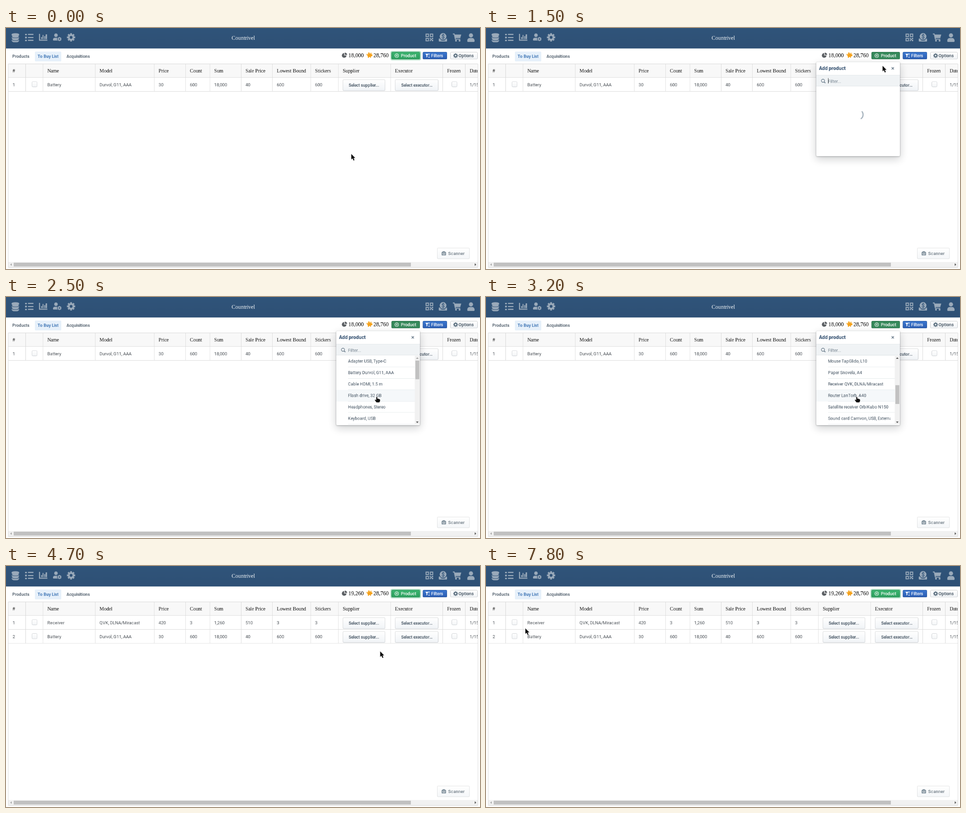
An HTML page with a canvas for the animation above (8 s loop, 1049x534 px).

```html
<!DOCTYPE html>
<html lang="en">
<head>
<meta charset="utf-8">
<title>To Buy List</title>
<style>
html, body { margin: 0; width: 100%; height: 100%; overflow: hidden; background: #fff; }
canvas { display: block; width: 1049px; height: 534px; }
</style>
</head>
<body>
<canvas id="stage"></canvas>
<script>
// The page is laid out on a larger screen and shown reduced by K.
const W = 1049, H = 534, K = 1.3, LOOP = 8000, STEP = 100;
const stage = document.getElementById('stage');
const dpr = window.devicePixelRatio || 1;
stage.width = W * dpr;
stage.height = H * dpr;
const out = stage.getContext('2d');
const screen = document.createElement('canvas');
screen.width = Math.ceil(W * K);
screen.height = Math.ceil(H * K);
const c = screen.getContext('2d');

const sans = (size, weight = 400) => `${weight} ${size}px Roboto, sans-serif`;
const serif = size => `${size}px "Liberation Serif", serif`;
const INK = '#3d4d5c', ICON = '#9aaaba', LINE = '#d8d8d8', PX = 1 / K;

// ---- drawing helpers ----
const snap = v => Math.round(v * K) / K;

function box(x, y, w, h, fill, r = 0, edge) {
  const x0 = snap(x), y0 = snap(y);
  const w0 = Math.max(PX, snap(x + w) - x0), h0 = Math.max(PX, snap(y + h) - y0);
  if (fill) {
    c.beginPath();
    c.roundRect(x0, y0, w0, h0, r);
    c.fillStyle = fill;
    c.fill();
  }
  if (edge) {
    c.beginPath();
    c.roundRect(x0 + PX / 2, y0 + PX / 2, w0 - PX, h0 - PX, r);
    c.strokeStyle = edge;
    c.lineWidth = PX;
    c.stroke();
  }
}
// Screen text: every glyph advances by whole pixels.
function text(s, x, y, font, color, centered) {
  c.save();
  c.setTransform(1, 0, 0, 1, 0, 0);
  c.font = font;
  c.fillStyle = color;
  const steps = [...s].map(ch => Math.round(c.measureText(ch).width));
  let left = Math.round(x * K - (centered ? steps.reduce((a, b) => a + b, 0) / 2 : 0));
  [...s].forEach((ch, i) => {
    c.fillText(ch, left, Math.round(y * K));
    left += steps[i];
  });
  c.restore();
}
function poly(points, fill) {
  c.beginPath();
  points.forEach(([x, y]) => c.lineTo(x, y));
  c.closePath();
  c.fillStyle = fill;
  c.fill();
}
function disc(x, y, rx, fill, ry = rx) {
  c.beginPath();
  c.ellipse(x, y, rx, ry, 0, 0, Math.PI * 2);
  c.fillStyle = fill;
  c.fill();
}
function stroke(points, color, width) {
  c.beginPath();
  points.forEach(([x, y]) => c.lineTo(x, y));
  c.strokeStyle = color;
  c.lineWidth = width;
  c.stroke();
}
function ring(x, y, r, color, width, from = 0, to = Math.PI * 2) {
  c.beginPath();
  c.arc(x, y, r, from, to);
  c.strokeStyle = color;
  c.lineWidth = width;
  c.stroke();
}
function fade(y, h, top, bottom) {
  const g = c.createLinearGradient(0, y, 0, y + h);
  g.addColorStop(0, top);
  g.addColorStop(1, bottom);
  return g;
}
function clip(x, y, w, h, draw) {
  c.save();
  c.beginPath();
  c.rect(x, y, w, h);
  c.clip();
  draw();
  c.restore();
}
function gear(x, y, r, color) {
  for (let i = 0; i < 8; i++) {
    c.save();
    c.translate(x, y);
    c.rotate(i * Math.PI / 4);
    c.fillStyle = color;
    c.fillRect(-r * 0.22, -r, r * 0.44, r * 0.5);
    c.restore();
  }
  ring(x, y, r * 0.55, color, r * 0.42);
}
function bust(x, y, s, color) {
  disc(x, y - 4.6 * s, 4.6 * s, color);
  box(x - 8 * s, y + 1.5 * s, 16 * s, 8 * s, color, [5 * s, 5 * s, 1.5 * s, 1.5 * s]);
}

// ---- top bar ----
const BAR = '#2f5277';
const barIcons = [
  () => {
    for (let i = 2; i >= 0; i--) {
      const y = 14 + i * 6;
      box(12.5, y, 16.5, 5.5, ICON, [0, 0, 5, 5]);
      disc(20.75, y, 8.25, ICON, 2.5);
      if (i) {
        c.beginPath();
        c.ellipse(20.75, y - 0.6, 8.25, 2.4, 0, 0, Math.PI);
        c.strokeStyle = BAR;
        c.lineWidth = 1;
        c.stroke();
      }
    }
  },
  () => [14.5, 21, 27.5].forEach(y => {
    box(42.5, y - 1.7, 3.4, 3.4, ICON, 0.8);
    box(48.5, y - 1.2, 12.5, 2.4, ICON, 0.8);
  }),
  () => {
    stroke([[74.2, 13], [74.2, 27], [91.5, 27]], ICON, 2.2);
    [[77.5, 20], [81, 15.5], [84.5, 18], [88, 14]].forEach(([x, y]) => box(x, y, 2.4, 24.5 - y, ICON, 0.6));
  },
  () => {
    bust(110.5, 20, 0.85, ICON);
    disc(118.3, 24.4, 5.4, BAR);
    gear(118.3, 24.4, 4.6, ICON);
  },
  () => gear(144, 20.7, 9.2, ICON),
  () => {
    [[929.5, 13.5], [939, 13.5], [929.5, 23]].forEach(([x, y]) => {
      c.strokeStyle = ICON;
      c.lineWidth = 2;
      c.strokeRect(x, y, 5.5, 5.5);
    });
    [[937.5, 21.5], [942.5, 21.5], [940, 24], [937.5, 26.5], [942.5, 26.5]].forEach(([x, y]) => box(x, y, 2.6, 2.9, ICON));
  },
  () => {
    box(958, 23, 18.5, 7, ICON, 1.5);
    disc(967.2, 18.6, 8.6, BAR);
    disc(967.2, 18.6, 7.4, ICON);
    text('$', 967.2, 22.9, sans(15.6, 700), BAR, true);
    box(962, 26.6, 10.5, 1.2, BAR);
  },
  () => {
    stroke([[989, 13.3], [992, 13.3], [994.5, 24.8], [1005.3, 24.8]], ICON, 2);
    poly([[992.4, 14.5], [1007.5, 14.5], [1005.3, 22.5], [994.2, 22.5]], ICON);
    disc(995.8, 28, 2, ICON);
    disc(1003.8, 28, 2, ICON);
  },
  () => bust(1029, 21, 1, ICON),
];
function topBar() {
  box(0, 0, W + 1, 45.4, fade(0, 45, '#30547a', '#2e5075'));
  barIcons.forEach(draw => draw());
  text('Countrivel', 525, 26.1, serif(16), '#f3f6f8', true);
}

// ---- toolbar ----
const looks = {
  plain: ['#ffffff', '#f1f4f7', 'rgba(16,22,26,.2)'],
  green: ['#3bb570', '#2b9e5d', 'rgba(16,22,26,.2)'],
  pressed: ['#35895a', '#35895a', 'rgba(16,22,26,.2)'],
  blue: ['#3c78d0', '#2b5db2', 'rgba(16,22,26,.25)'],
};
function button(x, y, w, h, kind) {
  const [top, bottom, edge] = looks[kind];
  box(x, y, w, h, fade(y, h, top, bottom), 2.3, edge);
}
function toolbar(s) {
  box(64, 52.5, 58, 21, '#e6f0fa', 2);
  text('Products', 14.2, 66.3, sans(12, 500), INK);
  text('To Buy List', 70.3, 66.3, sans(12, 500), '#2a66ad');
  text('Acquisitions', 134, 66.3, sans(12, 500), INK);

  // totals
  c.beginPath();
  c.moveTo(748.4, 60.8);
  c.arc(748.4, 60.8, 5.2, 0, Math.PI * 1.5);
  c.fillStyle = '#5b5f63';
  c.fill();
  c.beginPath();
  c.moveTo(749.7, 59.6);
  c.arc(749.7, 59.6, 5.2, -Math.PI / 2, 0);
  c.fill();
  text(s.added ? '19,260' : '18,000', 758, 64.6, serif(16), '#000');
  const PIG = '#f5a21b';
  disc(804.5, 60.6, 4.9, PIG, 3.9);
  disc(803, 55.8, 1.8, PIG);
  box(801, 63, 2, 3.2, PIG);
  box(806, 63, 2, 3.2, PIG);
  box(807.5, 58.8, 3, 3.4, PIG, 0.7);
  poly([[806, 55.3], [809, 54.8], [808.5, 59]], PIG);
  ring(799, 58.8, 1.2, PIG, 0.8);
  text('28,760', 813.3, 64.6, serif(16), '#000');

  const y = 53.1, h = 16.2, mid = y + h / 2, base = 64.6;
  if (!s.popup) box(850.8, y - 2.3, 67.3, h + 4.6, 'rgba(46,170,100,.4)', 4);
  button(853, y, 63, h, s.popup || s.hover ? 'pressed' : 'green');
  ring(864.7, mid, 4.1, '#fff', 1.1);
  stroke([[862.6, mid], [866.8, mid]], '#fff', 1.1);
  stroke([[864.7, mid - 2.1], [864.7, mid + 2.1]], '#fff', 1.1);
  text('Product', 873.5, base, sans(12.6, 500), '#fff');

  button(922, y, 54.5, h, 'blue');
  poly([[928, 57.1], [935, 57.1], [932.5, 60.3], [932.5, 63.8], [930.5, 65.3], [930.5, 60.3]], '#fff');
  [57.2, 60.4, 63.6].forEach(top => box(934.5, top, 3.2, 1.4, '#fff'));
  text('Filters', 941, base, sans(12.6, 500), '#fff');

  button(983, y, 61, h, 'plain');
  gear(995, mid, 5.1, '#5c7080');
  text('Options', 1001.6, base, sans(12.6, 500), INK);
}

// ---- table ----
const widths = [50, 50, 150, 170, 90, 70, 90, 90, 110, 80, 150, 150, 65, 100];
const heads = ['#', '', 'Name', 'Model', 'Price', 'Count', 'Sum', 'Sale Price', 'Lowest Bound', 'Stickers', 'Supplier', 'Executor', 'Frozen', 'Date'];
const battery = ['', 'Battery', 'Durvol, G11, AAA', '30', '600', '18,000', '40', '600', '600'];
const receiver = ['', 'Receiver', 'QVK, DLNA/Miracast', '420', '3', '1,260', '510', '3', '3'];
const ROW = 40 / K, HEAD = 103 / K, BODY = 143 / K, PAD = 13 / K;
const left = [];
widths.reduce((x, w) => (left.push(x / K), x + w), 6);

function checkbox(x, y) {
  box(x, y, 12.3, 12.3, fade(y, 12, '#ffffff', '#f3f5f7'), 2.3, '#c8ccd0');
}
function row(cells, i) {
  const y = BODY + i * ROW;
  [String(i + 1), ...cells].forEach((s, k) => text(s, left[k] + PAD, y + 19.2, sans(12.6), '#4c5258'));
  checkbox(56.7, y + 8.7);
  checkbox(986.2, y + 8.7);
  [[745.5, 93.5, 'Select supplier...'], [861, 96, 'Select executor...']].forEach(([x, w, label]) => {
    button(x, y + 4, w, 25, 'plain');
    text(label, x + w / 2, y + 20.2, sans(12, 500), INK, true);
  });
  text('1/15/2021', left[13] + PAD, y + 19.2, sans(12.6), '#4c5258');
  box(5, y + ROW - PX, 1040, PX, LINE);
}
function table(s) {
  const rows = s.added ? [receiver, battery] : [battery];
  clip(5, 79, 1039.5, 452, () => {
    box(5, HEAD, 1040, ROW, '#f8f8f8');
    heads.forEach((h, i) => text(h, left[i] + PAD, 98.6, serif(14.4), '#111'));
    rows.forEach(row);
    box(5, BODY - PX, 1040, PX, LINE);
    left.slice(1).forEach(x => box(x, HEAD, PX, ROW * (rows.length + 1), LINE));
  });
  // horizontal scrollbar
  box(5, 518.5, 1039, 11.5, '#f1f1f1');
  box(17, 520, 879, 8.5, '#c1c1c1');
  poly([[9.3, 524.3], [12.7, 521.4], [12.7, 527.2]], '#a3a3a3');
  poly([[1040.7, 524.3], [1037.3, 521.4], [1037.3, 527.2]], '#505050');
  box(4.6, 79, 1040, 452, null, 0, '#d0d0d0');
}
function scanner() {
  c.save();
  c.globalAlpha = 0.72;
  button(954, 487, 72, 24.6, 'plain');
  box(963.8, 496.3, 10.4, 7.6, '#5c7080', 1.3);
  box(966.5, 494.7, 5, 3, '#5c7080', 1);
  disc(969, 500, 2.7, '#fff');
  disc(969, 500, 1.6, '#5c7080');
  text('Scanner', 978.8, 503.1, sans(12.6, 500), INK);
  c.restore();
}

// ---- popup ----
const PITCH = 33 / K, TOTAL = 19, TOP = 168.5 / K, VIEW = 153;
const items = [
  'Adapter USB, Type-C', 'Battery Durvol, G11, AAA', 'Cable HDMI, 1.5 m', 'Flash drive, 32 GB',
  'Headphones, Stereo', 'Keyboard, USB', 'Lamp, LED', 'Monitor, 24 inch',
  'Mouse TapGlido, L10', 'Paper Snovela, A4', 'Receiver QVK, DLNA/Miracast', 'Router LanTorb, A40',
  'Satellite receiver OrbiKubo N150', 'Sound card Carrivon, USB, External',
];
function list(s) {
  clip(731, TOP, 185, VIEW, () => {
    items.forEach((label, i) => {
      const y = TOP + (i - s.scroll) * PITCH;
      if (y < TOP - PITCH || y > TOP + VIEW) return;
      if (s.hand && s.y >= y && s.y < y + PITCH) box(731, y, 173.5, PITCH, s.t < 3500 ? '#f5f8fa' : '#f0f4f9');
      clip(757, y, 138, PITCH, () => text(label, 756.6, y + 15.8, sans(12), INK));
      box(757, y + PITCH - PX, 147.5, PX, '#e2e7ea');
    });
    box(904.5, TOP, 11.5, VIEW, '#f1f1f1');
    const thumb = 130 * VIEW / (TOTAL * PITCH);
    box(906, 141 + 130 * s.scroll / TOTAL, 8.5, thumb, '#c1c1c1');
    poly([[910.2, 133.6], [913, 137], [907.4, 137]], s.scroll ? '#505050' : '#a3a3a3');
    poly([[910.2, 279.3], [913, 275.9], [907.4, 275.9]], '#505050');
  });
}
function popup(s) {
  c.save();
  c.globalAlpha = s.alpha;
  c.shadowColor = 'rgba(16,22,26,.2)';
  [[8, 24], [2, 4]].forEach(([drop, blur]) => {
    c.shadowOffsetY = drop;
    c.shadowBlur = blur;
    box(731, 75, 185, 208.5, '#fff', 2.3);
  });
  c.shadowColor = 'transparent';
  box(731 - PX, 75 - PX, 185 + 2 * PX, 208.5 + 2 * PX, null, 2.6, 'rgba(16,22,26,.1)');
  text('Add product', 737, 93.4, sans(14, 700), '#2c4a6b');
  stroke([[897.6, 86.8], [902.8, 92]], '#5c7080', 1.4);
  stroke([[902.8, 86.8], [897.6, 92]], '#5c7080', 1.4);
  box(731, 104, 185, 25.5, '#f0f3f5');
  box(731, 104, 185, PX, '#e0e5e8');
  box(731, 128.8, 185, PX, '#dce2e6');
  ring(745.8, 116.8, 3.5, '#6b7d8c', 1.3);
  stroke([[748.4, 119.4], [751, 122]], '#6b7d8c', 1.8);
  text('Filter...', 756.6, 121.3, sans(12.6), '#75838f');
  if (s.caret) box(757, 111, PX, 12, '#222');
  if (s.listed) list(s);
  else if (s.t >= 1300) {
    const a = 0.6 + (s.t - 2100) / 500 * Math.PI * 2;
    c.lineCap = 'round';
    ring(823.5, 192, 11, '#a5b2bd', 2.5, a, a + Math.PI / 2);
  }
  c.restore();
}

// ---- pointer ----
const ease = u => u * u * (3 - 2 * u);
// time, x, y, glide from the previous key
const path = [
  [0, 764, 279], [200, 764, 279], [1000, 886, 65, 1], [1300, 886, 65], [2100, 832, 185, 1],
  [2500, 820.5, 221, 1], [3500, 825, 200], [3700, 828, 189], [4700, 828, 189], [5000, 831, 185],
  [5300, 825, 192], [5500, 668, 302], [5800, 334, 242], [6000, 333, 241], [7200, 341, 237],
  [7400, 155, 174], [7600, 126, 160], [7800, 87, 138],
];
function pointerAt(t) {
  const next = path.findIndex(k => k[0] > t);
  const a = path[next < 0 ? path.length - 1 : next - 1], b = path[next];
  if (!b || !b[3]) return [a[1], a[2]];
  const u = ease((t - a[0]) / (b[0] - a[0]));
  return [a[1] + (b[1] - a[1]) * u, a[2] + (b[2] - a[2]) * u];
}
const arrow = new Path2D('M0 0V12.4L2.9 9.8L5 14.7L7.2 13.8L5.2 9.1H8.9Z');
const hand = new Path2D('M-1.1 .9Q0 -.5 1.1 .9V4.2Q2.4 3.6 3.2 4.8Q4.6 4.3 5.3 5.5Q7 5.1 7.3 6.6V9.2L5.8 12.4H-.6L-3.9 8.2Q-4.6 6.6 -3 6.4L-1.1 7.8Z');
function pointer(s) {
  const shape = s.hand ? hand : arrow;
  c.save();
  c.translate(s.x, s.y);
  c.lineJoin = 'round';
  c.lineWidth = 1.5;
  c.strokeStyle = 'rgba(255,255,255,.9)';
  c.stroke(shape);
  c.fillStyle = '#0c0c0c';
  c.fill(shape);
  c.restore();
}

// ---- timeline ----
const within = (t, a, b) => t >= a && t < b;
function stateAt(t) {
  const [x, y] = pointerAt(t);
  return {
    t, x, y,
    hover: within(t, 1100, 1200),
    popup: within(t, 1200, 4500),
    alpha: t < 1300 ? 0.6 : 1,
    listed: t >= 2200,
    scroll: t < 3200 ? 0 : 8,
    caret: within(t, 1300, 1600) || within(t, 2200, 2500) || within(t, 3900, 4200),
    hand: within(t, 1100, 1400) || within(t, 2300, 4700),
    added: t >= 4500,
  };
}
function frame() {
  const t = Math.floor(performance.now() % LOOP / STEP) * STEP;
  const s = stateAt(t);
  c.setTransform(K, 0, 0, K, 0, 0);
  box(0, 0, W + 1, H + 1, '#fff');
  topBar();
  toolbar(s);
  table(s);
  scanner();
  if (s.popup) popup(s);
  pointer(s);
  out.setTransform(dpr, 0, 0, dpr, 0, 0);
  out.drawImage(screen, 0, 0, screen.width / K, screen.height / K);
  requestAnimationFrame(frame);
}
frame();
</script>
</body>
</html>
```
